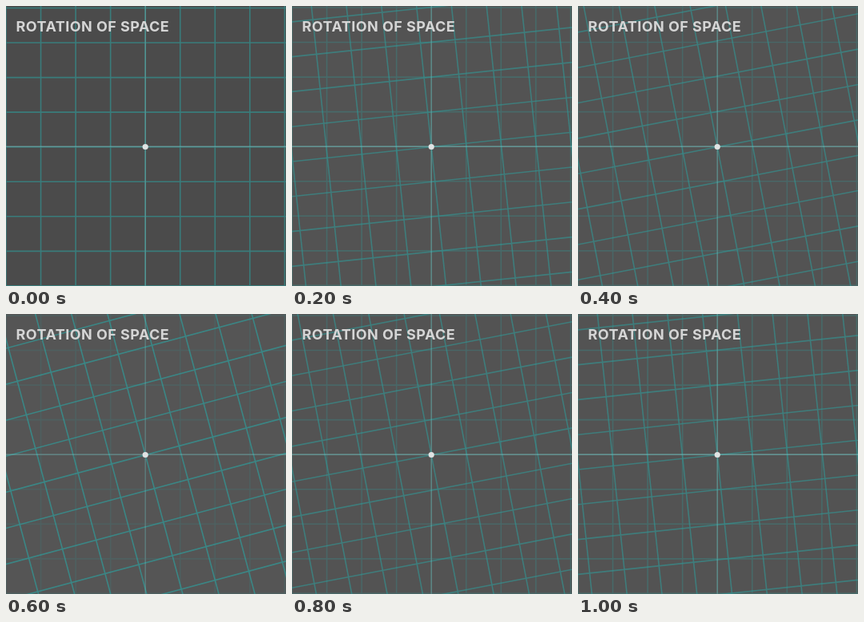
Write an HTML page that moves like this. It is 350 px wide and 351 px high and loops after 1200 ms.

```html
<!DOCTYPE html>
<html lang="en">
<head>
<meta charset="utf-8">
<title>Rotation of space</title>
<style>
  html, body { margin: 0; width: 100%; height: 100%; overflow: hidden; background: #535353; }
  svg { display: block; width: 100%; height: 100%; }
  path { fill: none; stroke: #2f9c9a; stroke-width: 1.6; }
  #axes path { stroke: #8ccfcd; stroke-width: 1.3; }
  #axes .upright { stroke-opacity: .65; }
  text { font: 700 18px Inter, "Open Sans", sans-serif; letter-spacing: .46px; fill: #d5d5d5; }
</style>
</head>
<body>
<svg viewBox="0 0 350 351">
  <rect id="back" width="350" height="351"/>
  <g transform="translate(174.2 176.2)">
    <path id="still"/>
    <path id="turning"/>
    <g id="axes">
      <path d="M-180 0H180"/>
      <path class="upright" d="M0-180V180"/>
    </g>
    <circle cy=".3" r="3.6" fill="#e0e3e3"/>
  </g>
  <text x="12.5" y="32">ROTATION OF SPACE</text>
</svg>
<script>
const $ = id => document.getElementById(id);
const [back, still, turning, axes] = ['back', 'still', 'turning', 'axes'].map($);
const STEP = 200, STEPS = 6, CELL = 43.55;

// Each pose holds for one step; the sequence swings out and back.
const poses = [
  { angle: 0,    back: '#4b4b4b', still: 0,   turning: .62, axes: .52 },
  { angle: 6,    back: '#535353', still: .32, turning: .58, axes: .55 },
  { angle: 10.9, back: '#535353', still: .28, turning: .58, axes: .52 },
  { angle: 15,   back: '#555555', still: .16, turning: .7,  axes: .42 }
];

let grid = '';
for (let i = -7; i <= 7; i++) {
  const p = i * CELL;
  grid += `M-320 ${p}H320M${p}-320V320`;
}
still.setAttribute('d', grid);
turning.setAttribute('d', grid);

function draw(now) {
  const step = Math.floor(now / STEP) % STEPS;
  const pose = poses[Math.min(step, STEPS - step)];
  back.setAttribute('fill', pose.back);
  turning.setAttribute('transform', `translate(0 .5) rotate(${-pose.angle})`);
  still.setAttribute('opacity', pose.still);
  turning.setAttribute('opacity', pose.turning);
  axes.setAttribute('opacity', pose.axes);
}

const start = performance.now();
function tick() {
  draw(performance.now() - start);
  requestAnimationFrame(tick);
}
tick();
</script>
</body>
</html>
```
